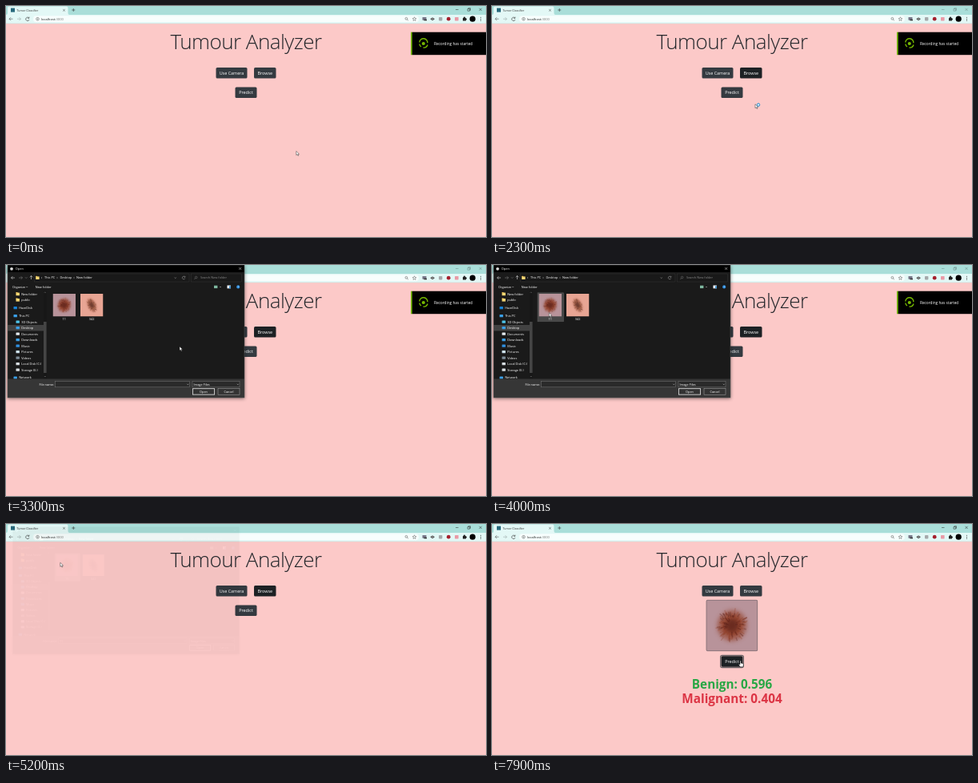
Animation of 600x289 px, one loop 8 s. Source, as an HTML page:

```html
<!DOCTYPE html>
<html>
<head>
<meta charset="utf-8">
<style>
html, body { margin: 0; width: 100%; height: 100%; overflow: hidden; background: #fcc9c8; }
svg { display: block; width: 100vw; height: 100vh; font-family: "Open Sans", "Noto Sans", sans-serif; }
text { white-space: pre; }
#dialog { filter: drop-shadow(0 1.5px 2px #0007); }
</style>
</head>
<body>
<script>
const rect = (x, y, w, h, fill, more = '') =>
  `<rect x="${x}" y="${y}" width="${w}" height="${h}" fill="${fill}" ${more}/>`;
const circle = (x, y, r, fill, more = '') =>
  `<circle cx="${x}" cy="${y}" r="${r}" fill="${fill}" ${more}/>`;
const line = (d, color, width = 0.6, more = '') =>
  `<path d="${d}" fill="none" stroke="${color}" stroke-width="${width}" ${more}/>`;
const text = (x, y, size, fill, s, more = '') =>
  `<text x="${x}" y="${y}" font-size="${size}" fill="${fill}" ${more}>${s}</text>`;
const group = (id, body, more = '') => `<g id="${id}" ${more}>${body}</g>`;
const MID = 'text-anchor="middle"';

let seed = 7;
const rnd = () => (seed = seed * 16807 % 2147483647) / 2147483647;

// Soft skin picture on a 64 x 64 square: blurred spot with radial streaks
function skin(bg, spot, dark, rx, ry, tilt) {
  let streaks = '';
  for (let i = 0; i < 120; i++) {
    const a = rnd() * 6.283, r = 0.25 + rnd() * 0.65, end = r + 0.1 + rnd() * 0.25;
    const point = k => `${(32 + k * rx * Math.cos(a)).toFixed(1)} ${(32 + k * ry * Math.sin(a)).toFixed(1)}`;
    streaks += line(`M${point(r)}L${point(end)}`, i % 3 ? spot : dark, 1.4, `opacity="${(0.6 - r * 0.35).toFixed(2)}"`);
  }
  const blob = (k, color, alpha) => `<ellipse cx="32" cy="32" rx="${rx * k}" ry="${ry * k}"
    fill="${color}" opacity="${alpha}" filter="url(#blur)"/>`;
  return rect(0, 0, 64, 64, bg) + `<g transform="rotate(${tilt} 32 32)">
    ${blob(1.05, spot, 0.55)}${blob(0.75, spot, 0.9)}${streaks}${blob(0.45, dark, 0.65)}</g>`;
}

const button = (id, x, y, w, label) => group(id,
  rect(x, y, w, 13.5, '#343a40', 'rx="1.6"') +
  text(x + w / 2, y + 8.8, 5.45, '#fff', label, MID));

function browser() {
  const ink = '#444';
  return rect(0, 0, 600, 11, '#a9ded9') +
    '<path d="M0 11Q2 11 2 9V2.5Q2 .5 4 .5H75.500Q77.500 .5 77.500 2.500V9Q77.500 11 79.500 11Z" fill="#e3f8f6"/>' +
    rect(0, 11, 600, 11, '#e3f8f6') + rect(0, 21.6, 600, 0.6, '#c9dad8') +
    rect(6, 2.6, 5, 5, '#27697c') +
    text(13.5, 6.6, 3.55, '#333', 'Tumor Classifier') +
    line('M71.2 4l2.6 2.6m0-2.6l-2.6 2.6', '#333', 0.5) +
    line('M82.3 5h4m-2-2v4', '#333') +
    line('M8.500 16.200H4m2-2l-2 2 2 2', '#555') +
    line('M14 16.200h4.500m-2-2l2 2-2 2', '#9aa9a8') +
    line('M28.600 15a2.200 2.200 0 1 0 .4 2M28.900 13.600v1.700h-1.700', '#333') +
    rect(34, 12.2, 482, 8, '#f7fefd', 'rx="4"') +
    circle(39.5, 16.2, 1.8, 'none', `stroke="${ink}" stroke-width=".5"`) + line('M39.500 15.900v1.300m0-2.300v.5', ink, 0.5) +
    text(44, 17.7, 4.15, '#222', 'localhost:<tspan fill="#777">3000</tspan>') +
    circle(500.4, 15.8, 1.4, 'none', `stroke="${ink}" stroke-width=".5"`) + line('M501.400 16.800l1.400 1.400', ink) +
    '<path d="M510.500 13.800l.7 1.600 1.700.2-1.300 1.100.4 1.700-1.500-.9-1.500.9.4-1.700-1.300-1.100 1.700-.2z" fill="none" stroke="#444" stroke-width=".45"/>' +
    rect(520.5, 14, 5, 3.8, '#778', 'rx=".6"') + rect(522.5, 16.8, 3.5, 1.5, '#333') +
    line('M530.600 16.200h5', '#444', 1) + circle(533.1, 16.2, 1.7, '#444') + circle(533.1, 16.2, 0.7, '#ddd') +
    rect(541, 14, 4.4, 4.4, '#a5a9ab', 'rx=".8"') +
    circle(553.2, 16.2, 2.4, '#a5202d') +
    rect(561, 14, 4.6, 4.4, '#e99aa6', 'rx=".6"') +
    rect(571, 14.8, 4, 3.6, '#222', 'rx=".5"') + circle(573, 14.5, 1, '#222') + circle(575, 16.5, 1, '#222') +
    circle(583.2, 16.2, 3.6, '#000') +
    [14.3, 16.2, 18.1].map(y => circle(593.4, y, 0.55, '#333')).join('') +
    group('controls', line('M562 4.500h3.500M577 3.600h2.600v2.600h-2.600zM577.900 3.600v-.9h2.600v2.600h-.9M591.500 2.800l3.200 3.200m0-3.200l-3.200 3.200', '#222', 0.5));
}

function notice() {
  const green = '#76b900';
  return rect(506, 32.7, 2, 28.5, green) + rect(507.7, 32.7, 92.3, 28.5, '#000') +
    line('M516.800 45.500A5 5 0 0 1 526.900 46.200M527 48.500A5 5 0 0 1 521.500 52M519 51A5 5 0 0 1 516.800 47.500', green, 1.4) +
    circle(521.8, 47, 2.1, green) +
    text(535, 48.9, 4.75, '#fff', 'Recording has started');
}

const folder = (x, y) => rect(x, y - 2.2, 2, 1.2, '#e0b040') + rect(x, y - 1.6, 4.4, 3.6, '#f7d774');

function sidebar() {
  const blue = '#3aa0e8';
  const items = [
    ['New folder', 36.2, 0], ['public', 43.6, 0], ['HazeDisk', 53.7, '#1683d8', 1], ['This PC', 63.6, blue, 1],
    ['3D Objects', 71.2, '#4fc3e8'], ['Desktop', 78.7, blue], ['Documents', 86.2, '#e4eaee'], ['Downloads', 93.7, blue],
    ['Music', 101.2, '#2f8fe0'], ['Pictures', 108.7, '#cfe4f2'], ['Videos', 116.2, '#7d8c98'],
    ['Local Disk (C:)', 123.7, '#d8dee2'], ['Storage (E:)', 131.2, '#d8dee2'], ['Network', 141, blue, 1]];
  return rect(2, 75, 45, 7.4, '#424242') + items.map(([name, y, color, top]) => {
    const x = top ? 9.5 : 12.5;
    return (color ? rect(x, y - 1.6, 4.4, 3.2, color, 'rx=".5"') : folder(x, y)) +
      text(x + 6.7, y + 1.4, 3.9, '#fff', name);
  }).join('') + rect(47, 32, 3.6, 110.500, '#171717') + rect(47, 71, 3.6, 64, '#454545') +
    line('M47.800 34.800l1-1 1 1M47.800 139l1 1 1-1', '#aaa', 0.4);
}

function dialog() {
  const white = '#fff', grey = '#8a8a8a';
  const box = (x, y, w, h, stroke, fill = '#2a2a2a', sw = 0.5) =>
    rect(x, y, w, h, fill, `stroke="${stroke}" stroke-width="${sw}"`);
  const thumb = (x, art, name) =>
    `<svg x="${x}" y="36" width="28.500" height="28.500" viewBox="0 0 64 64">${art}</svg>` +
    text(x + 14.2, 69, 3.9, white, name, MID);
  const address = line('M11 16H6.500m1.800-1.800L6.500 16l1.800 1.800', white, 0.5) +
    line('M16 16h4.500m-1.800-1.800L20.500 16l-1.800 1.800M24 15.300l1.200 1.200 1.200-1.200', grey, 0.5) +
    line('M31.500 18v-4.500m-1.800 1.800l1.800-1.800 1.800 1.800', white, 0.5) +
    box(35.5, 11, 193.5, 10, '#3a3a3a', '#191919', 0.4) + folder(37.2, 16) +
    text(48, 17.4, 3.9, white, 'This PC') + text(67.4, 17.4, 3.9, white, 'Desktop') + text(88, 17.4, 3.9, white, 'New folder') +
    line('M44 15l1 1-1 1M63.500 15l1 1-1 1M84.500 15l1 1-1 1M210.500 15.500l1.200 1.200 1.200-1.200', '#bbb', 0.45) +
    line('M223.600 15a1.800 1.800 0 1 0 .2 1.600M223.900 13.800v1.400h-1.400', '#bbb', 0.45) +
    box(231.5, 11, 63, 10, '#3a3a3a', '#191919', 0.4) +
    circle(237.6, 15.5, 1.3, 'none', 'stroke="#888" stroke-width=".45"') + line('M236.700 16.500l-1.400 1.400', grey, 0.5) +
    text(243, 17.4, 3.9, grey, 'Search New folder') +
    text(8, 28.9, 3.9, white, 'Organize') + line('M25.200 27l1 1 1-1', white, 0.4) +
    text(36.8, 28.9, 3.9, white, 'New folder') +
    rect(260, 25.7, 4.4, 3.4, '#7fb8a0') + line('M267 27l1 1 1-1', white, 0.4);
  const form = text(60, 150.6, 3.9, white, 'File name:', 'text-anchor="end"') +
    box(61.5, 145.6, 168, 7.2, '#777') + line('M226.300 148.800l1 1 1-1', white, 0.4) +
    group('fileName', text(63, 150.6, 3.9, white, '11')) +
    box(233, 145.6, 59, 7.2, '#777') + text(234.5, 150.6, 3.9, white, 'Image Files') + line('M288.800 148.800l1 1 1-1', white, 0.4) +
    box(233.4, 154.7, 27.2, 7.4, '#e8e8e8', '#333', 0.8) + text(247, 159.8, 3.9, white, 'Open', MID) +
    box(265, 154.6, 27, 7.6, '#aaa', '#333') + text(278.5, 159.8, 3.9, white, 'Cancel', MID);
  // Controls not painted yet
  const blanks = [[2, 9.3, 296, 13.2], [43, 146.3, 17, 5], [61.5, 145.3, 168, 7.500], [233, 145.3, 59, 7.500],
    [233, 154.3, 27.500, 8], [264.500, 154.3, 27.500, 8], [292, 161, 6, 5]]
    .map(b => rect(...b, '#fff')).join('');
  return rect(2, 0, 296, 166, '#1a1a1a') + rect(2, 0, 296, 9, '#000') +
    circle(7, 4.8, 1.9, '#ddd') + text(11.8, 6.2, 3.9, white, 'Open') +
    line('M291.200 3l3 3m0-3l-3 3', white, 0.45) +
    sidebar() +
    rect(276.5, 25.5, 4.4, 3.8, white) + rect(279, 26.2, 1.9, 3.1, '#3a8fd0') +
    circle(290.2, 27.4, 2.1, '#2f8fe0') + text(290.2, 28.6, 3.2, '#fff', '?', MID) +
    group('hover', rect(57, 34.8, 32.6, 36, '#6f6f6f', 'stroke="#8c8c8c" stroke-width=".5"')) +
    thumb(58.5, moleA, '11') + thumb(93, moleB, '342') +
    rect(2, 142.5, 296, 23.5, '#363636') +
    group('loaded', address + form) + group('blanks', blanks) +
    '<rect x="2" y="0" width="296" height="166" fill="none" stroke="#555" stroke-width=".5"/>';
}

const moleA = skin('#b8939a', '#94452f', '#541c16', 18, 19, 15);
const moleB = skin('#e8a594', '#a5604a', '#4a231b', 11, 19, -25);

document.body.innerHTML = `<svg viewBox="0 0 600 289" preserveAspectRatio="none">
  <defs><filter id="blur" x="-50%" y="-50%" width="200%" height="200%"><feGaussianBlur stdDeviation="2.500"/></filter></defs>
  ${rect(0, 0, 600, 289, '#fcc9c8')}${browser()}
  ${text(300, 53.8, 26, '#212529', 'Tumour Analyzer', MID + ' font-weight="300" letter-spacing="-.52"')}
  ${button('camera', 262.5, 77, 39, 'Use Camera')}${button('browse', 310, 77, 27.5, 'Browse')}
  ${group('photo', `<svg x="268" y="95" width="64" height="64" viewBox="0 0 64 64">${moleA}</svg>` +
    rect(268, 95.3, 63.7, 63.4, 'none', 'rx="1.500" stroke="#75666a" stroke-width=".7"'))}
  ${group('predictBox', rect(285.6, 100.6, 28.8, 15.4, 'none', 'id="ring" rx="2.200" stroke="#6b6467" stroke-width="1.200"') +
    button('predict', 286.5, 101.5, 27, 'Predict'))}
  ${group('results', text(300, 205.7, 15.3, '#28a745', 'Benign: 0.596', MID) +
    text(300, 224.3, 15.3, '#dc3545', 'Malignant: 0.404', MID), 'font-weight="700"')}
  ${group('notice', notice())}${group('dialog', dialog())}
  ${group('cursor',
    '<path id="arrow" d="M0 0V5l1.200-1.100.9 1.900 .9-.4-.9-1.800h1.600z" fill="#fff" stroke="#222" stroke-width=".45"/>' +
    group('busy', circle(4, 0.8, 1.7, '#e8f6ff', 'stroke="#1b87c9" stroke-width="1"')) +
    '<path id="hand" d="M-.6 .5Q0-.4.6.5V3l2.400.6q.8.300.7 1.200L3.200 7.800H-.4L-2.300 4.800q.2-.9 1.100-.4l.6.500z" fill="#fff" stroke="#111" stroke-width=".5"/>')}
</svg>`;

const $ = id => document.getElementById(id);
const show = (id, on) => $(id).style.display = on ? '' : 'none';

// Each key: time, then values
const pointer = [[0, 362.8, 181.6], [400, 362.8, 181.6], [600, 354.5, 180.5], [800, 354.5, 180.5], [1100, 351.5, 178.5],
  [1200, 351.5, 178.5], [1800, 322, 85], [2000, 322, 85], [2200, 329, 122.8], [3000, 329, 122.8], [3300, 217, 102],
  [3900, 72, 62], [4300, 67.8, 48.3], [5400, 67.8, 48.3], [6300, 320, 128], [6700, 379, 165], [7200, 310.6, 171], [8000, 310.6, 171]];
const fade = [[0, 0, 0.97], [2300, 0, 0.97], [2400, 0.35, 0.97], [2500, 0.77, 0.988], [2600, 1, 1],
  [5000, 1, 1], [5100, 0.45, 0.975], [5200, 0.035, 0.955], [5300, 0, 0.95], [8000, 0, 0.95]];

function at(keys, t) {
  const i = keys.findIndex(k => k[0] > t), a = keys[i - 1], b = keys[i];
  const u = (t - a[0]) / (b[0] - a[0]), e = u * u * (3 - 2 * u);
  return [1, 2].map(j => a[j] + (b[j] - a[j]) * e);
}

function draw(t) {
  const [x, y] = at(pointer, t), [alpha, scale] = at(fade, t);
  const within = (a, b) => t >= a && t < b;
  const fill = (id, dark) => $(id).firstChild.setAttribute('fill', dark ? '#1d2124' : '#343a40');

  $('cursor').setAttribute('transform', `translate(${x} ${y})`);
  const overButton = within(1700, 2100) || t >= 7100;
  show('arrow', !overButton);
  show('hand', overButton);
  show('busy', within(2200, 2400));

  $('controls').setAttribute('opacity', within(2100, 5100) ? 0.45 : 1);
  fill('browse', within(1700, 7400));
  fill('predict', t >= 7100);
  show('ring', t >= 7400);
  show('notice', t < 5100);
  show('photo', t >= 5400);
  $('predictBox').setAttribute('transform', `translate(0 ${t >= 5400 ? 63.7 : 0})`);
  show('results', t >= 7800);

  show('dialog', alpha > 0);
  $('dialog').setAttribute('opacity', alpha);
  $('dialog').setAttribute('transform', `translate(150 83) scale(${scale}) translate(-150 -83)`);
  show('loaded', t >= 2600);
  show('blanks', t < 2600);
  show('hover', within(3900, 5300));
  $('hover').setAttribute('opacity', t < 4400 ? 0.55 : 1);
  show('fileName', t >= 4400);
}

const start = performance.now();
(function tick() {
  draw(Math.floor((performance.now() - start) % 8000 / 100) * 100);
  requestAnimationFrame(tick);
})();
</script>
</body>
</html>
```
